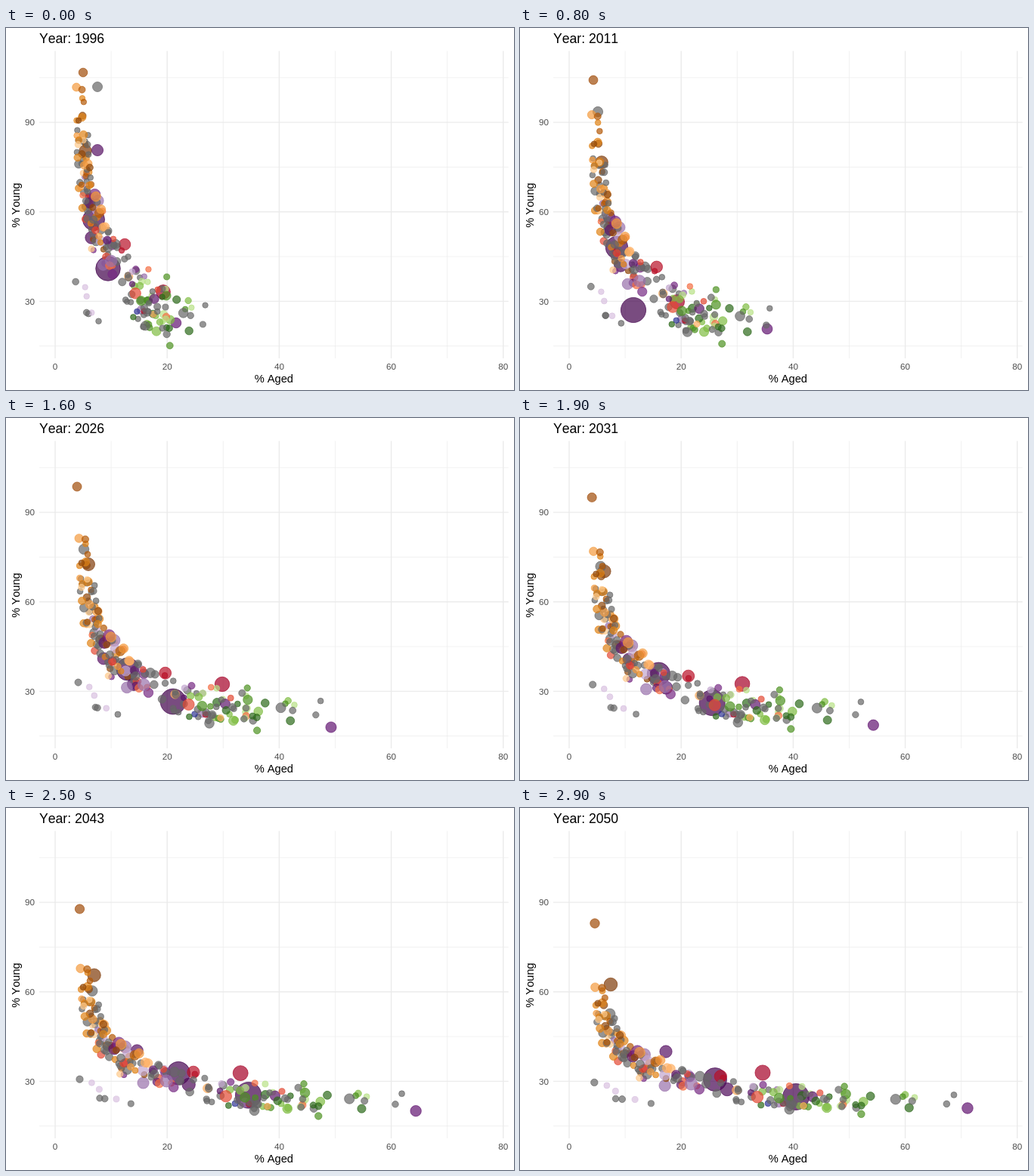
These frames come from a looping animation (672x480 px, 3 s). An HTML page:

```html
<!DOCTYPE html>
<html lang="en">
<head>
<meta charset="utf-8">
<style>
  html, body { margin: 0; width: 100%; height: 100%; overflow: hidden; background: #fff; }
  svg { display: block; font: 14.67px "Liberation Sans", Arial, sans-serif; font-kerning: none; }
  .grid path { stroke: #ebebeb; }
  .tick { font-size: 11.73px; fill: #4d4d4d; }
  .dots { fill-opacity: .7; stroke-opacity: .7; stroke-width: .94; }
</style>
</head>
<body>
<svg width="672" height="480" viewBox="0 0 672 480">
  <g class="grid"></g>
  <g class="dots"></g>
  <text id="year" x="44" y="20" font-size="17.6"></text>
  <text x="354.3" y="470" text-anchor="middle">% Aged</text>
  <text transform="translate(18 235) rotate(-90)" text-anchor="middle">% Young</text>
</svg>
<script>
const STEPS = 30, STEP_MS = 100;
const grid = document.querySelector('.grid'), layer = document.querySelector('.dots');
const year = document.getElementById('year');

function add(parent, tag, attrs, text) {
  const el = document.createElementNS('http://www.w3.org/2000/svg', tag);
  for (const name in attrs) el.setAttribute(name, attrs[name]);
  if (text !== undefined) el.textContent = text;
  return parent.appendChild(el);
}

const mix = (a, b, k) => a + (b - a) * k;
const px = aged => 65 + 7.41 * aged, py = young => 481 - 3.954 * young;

// Major grid lines carry labels
for (const major of [false, true]) {
  const width = major ? 1.42 : 0.71;
  for (let v = major ? 0 : 10; v <= 80; v += 20) {
    add(grid, 'path', { d: `M${px(v)} 30.5V438`, 'stroke-width': width });
    if (major) add(grid, 'text', { class: 'tick', x: px(v), y: 453, 'text-anchor': 'middle' }, v);
  }
  for (let v = major ? 30 : 15; v <= 105; v += 30) {
    add(grid, 'path', { d: `M44 ${py(v)}H664.7`, 'stroke-width': width });
    if (major) add(grid, 'text', { class: 'tick', x: 38, y: py(v) + 4.2, 'text-anchor': 'end' }, v);
  }
}

let seed = 29;
function random() {
  seed = (seed * 16807) % 2147483647;
  return seed / 2147483647;
}

// The few large bubbles follow key points
const KEYS = [0, 8, 16, 29];
function keyed(color, r, ...points) {
  const place = step => {
    const i = step < KEYS[1] ? 0 : step < KEYS[2] ? 1 : 2;
    const k = (step - KEYS[i]) / (KEYS[i + 1] - KEYS[i]);
    return [0, 1].map(axis => mix(points[i][axis], points[i + 1][axis], k));
  };
  return { color, r, place };
}

const large = [
  keyed('#40004b', 16.3, [135, 319], [150, 374], [221, 376], [365, 383]),
  keyed('#460552', 14.5, [116, 254], [128, 291], [161, 333], [258, 360]),
  keyed('#a50026', 9.4, [208, 350], [208, 363], [286, 353], [321, 351]),
  keyed('#611470', 6.8, [225, 391], [327, 399], [430, 410], [592, 398]),
  keyed('#7f3b08', 8.2, [105, 163], [108, 178], [109, 194], [120, 234]),
  keyed('#a04b08', 5.8, [102, 59], [97, 69], [94, 91], [99, 153]),
  keyed('#4d0959', 8.2, [113, 278], [133, 315], [169, 353], [274, 373]),
  keyed('#551062', 7.6, [121, 162], [118, 251], [129, 319], [193, 323]),
  keyed('#666', 6.5, [121, 78], [103, 111], [103, 174], [119, 273])
];

// The rest slide down a shared curve: rank 0 is the youngest country, 1 the most aged
function ranked(color, r, rank, lift) {
  const dx = random() * 2 - 1, dy = random() + random() - 1;
  const place = step => {
    const p = step / (STEPS - 1), fall = p ** 1.2;
    const aged = 4.5 + p + mix(19, 55, fall) * rank ** 2.2;
    const bend = mix(1.35, 1.9, Math.min(1, 2 * p));
    const young = 23 + mix(72, 36, fall) * lift * (1 - rank) ** bend;
    return [px(aged * (1 + 0.2 * dx)), py(young + dy * mix(11, 5, p))];
  };
  return { color, r, place };
}

const groups = [
  { colors: ['#666'], count: 74, from: 0.08, to: 1, grow: 2.6 },
  { colors: ['#e08214', '#b35806', '#f39a3d', '#8f4608', '#e08214', '#fdc98a'], count: 46, from: 0, to: 0.5, grow: 3 },
  { colors: ['#9970ab', '#5d176b', '#c2a5cf', '#762a83'], count: 22, from: 0.25, to: 0.85, grow: 4 },
  { colors: ['#e34933', '#f46d43', '#fdae61', '#b80f27'], count: 22, from: 0.3, to: 0.85, grow: 4 },
  { colors: ['#7fbc41', '#4d9221', '#b8e186', '#2c691a'], count: 32, from: 0.78, to: 1, grow: 3 },
  { colors: ['#313695'], count: 1, from: 0.75, to: 0.85, grow: 2 },
  { colors: ['#666', '#d8c0df'], count: 7, from: 0, to: 0.5, grow: 1, lift: 0.2 }
];

const small = groups.flatMap(({ colors, count, from, to, grow, lift = 1 }) =>
  Array.from({ length: count }, (_, i) => ranked(
    colors[i % colors.length],
    3.7 + grow * random() ** 2,
    mix(from, to, (i + random()) / count),
    lift
  ))
).sort(() => random() - 0.5);

const dots = [...large, ...small].map(dot => ({
  ...dot,
  el: add(layer, 'circle', { fill: dot.color, stroke: dot.color })
}));

function draw(step) {
  const progress = step / (STEPS - 1);
  year.textContent = 'Year: ' + Math.round(mix(1996, 2050, progress));
  for (const { el, r, place } of dots) {
    const [x, y] = place(step);
    el.setAttribute('cx', x);
    el.setAttribute('cy', y);
    el.setAttribute('r', r * (1 + 0.07 * progress));
  }
}

const start = performance.now();
function tick() {
  draw(Math.floor(Math.max(0, performance.now() - start) / STEP_MS) % STEPS);
  requestAnimationFrame(tick);
}
tick();
</script>
</body>
</html>
```
